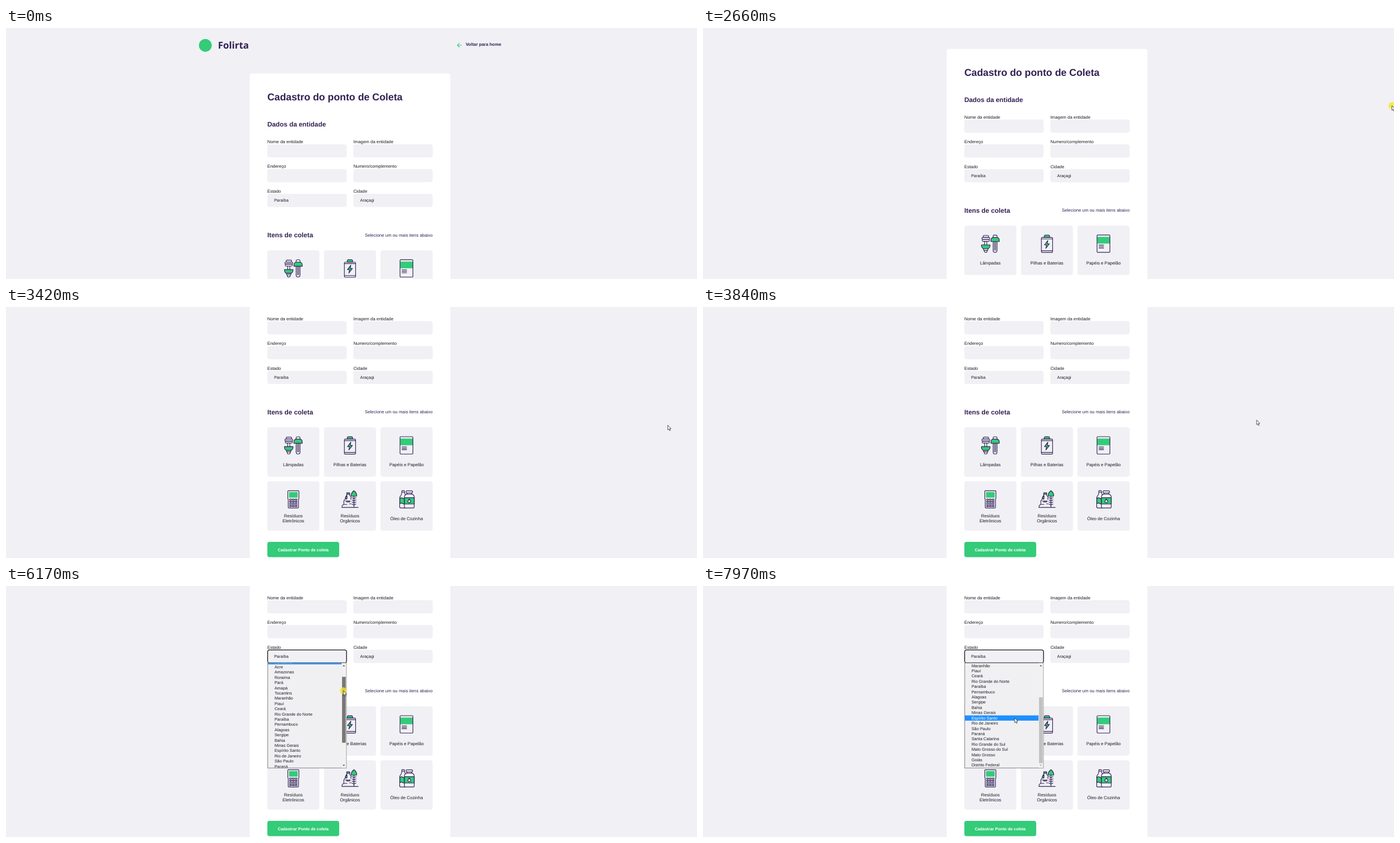
These frames come from a looping animation (1242x451 px, 8000 ms). An HTML page:

```html
<!DOCTYPE html>
<html lang="pt-BR">
<head>
<meta charset="utf-8">
<title>Cadastro do ponto de coleta</title>
<style>
  html, body { margin: 0; width: 100%; height: 100%; overflow: hidden; background: #f0f0f5; }
  svg { display: block; width: 1242px; height: 451px; }
  text { font: 7.9px "Liberation Sans", Arial, sans-serif; fill: #1c1a22; text-rendering: geometricPrecision; }
  .purple { fill: #322153; }
  .h1 { font-size: 17.8px; font-weight: 700; }
  .h2 { font-size: 11.85px; font-weight: 700; }
  .bold { font-weight: 700; }
  .small { font-size: 7.4px; }
  .brand { font: 700 17px "Noto Sans", "Open Sans", sans-serif; }
  .mid { text-anchor: middle; }
  .end { text-anchor: end; }
  .white { fill: #fff; }
  .box { fill: #f0f0f5; }
  .icon { fill: none; stroke: #322153; stroke-width: 1.15; stroke-linejoin: round; stroke-linecap: round; }
  .icon .g { fill: #34cb79; }
  .icon .flat { fill: #34cb79; stroke: none; }
  .icon .bg { fill: #f0f0f5; }
</style>
</head>
<body>
<svg viewBox="0 0 1242 451">
  <defs><clipPath id="listClip"><rect x="470" y="138.4" width="142" height="188.2"/></clipPath></defs>
  <g id="page">
    <circle cx="358.3" cy="31.2" r="11.5" fill="#34cb79"/>
    <text class="brand purple" x="381" y="37.4">Folirta</text>
    <path d="M819 31h-7.6m3.7-3.8l-3.8 3.8l3.8 3.8" fill="none" stroke="#34cb79" stroke-width="1.2"/>
    <text class="bold purple" x="826.2" y="32.1">Voltar para home</text>
    <rect x="437.9" y="81.8" width="360.8" height="640" rx="4" fill="#fff"/>
    <text class="h1 purple" x="469.7" y="130.3">Cadastro do ponto de Coleta</text>
    <text class="h2 purple" x="469.7" y="177.3">Dados da entidade</text>
    <g id="fields"></g>
    <text class="h2 purple" x="469.7" y="376.3">Itens de coleta</text>
    <text class="purple end" x="766.9" y="374.7">Selecione um ou mais itens abaixo</text>
    <g id="items"></g>
    <rect x="469.7" y="605.2" width="129.2" height="27.6" rx="4" fill="#34cb79"/>
    <text class="small bold white mid" x="534.2" y="622">Cadastrar Ponto de coleta</text>
  </g>
  <g id="menu">
    <rect x="470.3" y="114.8" width="141.8" height="23.4" rx="3.5" fill="none" stroke="#101010" stroke-width="1.3"/>
    <rect x="470.4" y="138.2" width="141.4" height="188.8" fill="#f0f0f3" stroke="#767676" stroke-width=".9"/>
    <g clip-path="url(#listClip)"><g id="list"><rect id="mark" x="470.8" width="132.4" height="9.41" fill="#1e90ff"/></g></g>
    <rect x="603.4" y="138.6" width="8" height="188" fill="#f1f1f1"/>
    <path id="up" d="M605.2 144.2l2-2.2l2 2.2z"/>
    <path id="down" d="M605.2 321.2l2 2.2l2-2.2z"/>
    <rect id="thumb" x="604" width="6.6" height="118.4"/>
  </g>
  <g id="pointer">
    <circle id="press" r="6.2" fill="#f6e62c" opacity=".78"/>
    <path d="M0 0V8.4L1.9 6.7L3.2 9.8L4.6 9.2L3.3 6.2H5.9Z" fill="#fff" stroke="#222" stroke-width=".75"/>
  </g>
</svg>
<script>
const $ = id => document.getElementById(id);
const LOOP = 8000, ROW = 9.41, LIST_TOP = 138.4, MAX_SCROLL = 9 * ROW;
const THUMB_TOP = 147, THUMB_RANGE = 53, GRAB_Y = 172;

const add = (parent, html) => parent.insertAdjacentHTML("beforeend", html);
const text = (x, y, str, cls = "") => `<text x="${x}" y="${y}" class="${cls}">${str}</text>`;
const rect = (x, y, w, h, r = 0, cls = "") =>
  `<rect x="${x}" y="${y}" width="${w}" height="${h}" rx="${r}" class="${cls}"/>`;
const path = (d, cls = "") => `<path d="${d}" class="${cls}"/>`;

// Form fields, two per row
[["Nome da entidade"], ["Imagem da entidade"], ["Endereço"], ["Numero/complemento"],
 ["Estado", "Paraíba"], ["Cidade", "Araçagi"]].forEach(([label, value = ""], i) => {
  const x = i % 2 ? 624.4 : 469.7, y = 208.9 + 44.55 * (i >> 1);
  add($("fields"), text(x, y - 2, label) + rect(x, y, 142.5, 23.6, 4, "box") +
    text(x + 12.2, y + 14.2, value, "small"));
});

// Icons are drawn around their own centre
const lamps =
  rect(-12.8, -15, 9.6, 3.6, 1.2) + rect(-15.3, -11.4, 14.2, 3.4, 1.5) + rect(-14.6, -8, 12.8, 3.6, 1.5) +
  path("M-10.3 -4.4V2M-6.4 -4.4V2") +
  path("M-16 2h15.4v2q0 2.2-3 4.8h-9.4q-3-2.6-3-4.8z", "g") +
  path("M-12 8.8h7.4v2.8h-7.4zM-10.8 11.6v2q0 1.6 1.6 1.6h1.8q1.6 0 1.6-1.6v-2") +
  path("M5 -11.4v-2.4q0-1.8 1.8-1.8h3.4q1.8 0 1.8 1.8v2.4") +
  path("M1 -4v-2.4q0-5 5-5h5q5 0 5 5v2.4z", "g") +
  path("M5 -4v16q0 3.4 3.5 3.4t3.5-3.4v-16M7.4 -4v15.6M9.6 -4v15.6");

const battery =
  path("M-4.8 -11.5v-2.2q0-2 2-2h5.6q2 0 2 2v2.2z", "g") +
  rect(-10, -11.4, 20.2, 27, 1.6) + path("M-10 -8.7h20.2M-10 12.6h20.2") +
  path("M1.6 -6L-4.4 2h3.8l-1.4 6.2l6.4-8.2h-3.8z", "g");

const paper =
  rect(-11.5, -12.4, 22.8, 12, 0, "flat") + rect(-11.7, -15.8, 23.2, 31.2, 1.6) +
  path("M-8.2 2.4h8.4M-8.2 5h8.4M-8.2 7.6h8.4");

let phone = path("M-8 15.4q-1.2 0-1.2-1.2v-14l-.8-2v-12.6q0-1.2 1.2-1.2h17.6q1.2 0 1.2 1.2v12.6l-.8 2v14q0 1.2-1.2 1.2z") +
  rect(-7.8, -13.4, 15.6, 10, .6, "flat");
for (let i = 0; i < 12; i++)
  phone += rect(-6.8 + 5 * (i % 3), -.8 + 3.9 * Math.floor(i / 3), 3.4, 2, .6);

let organic =
  path("M-14.2 14.2q-.6-4.4 3.2-5v-5.6q.2-2.6 3-4.4v-1.8q0-3 2.4-5v-2h5v2q2.6 2 2.6 5l-1 2.2") +
  path("M-5.8 -12h5.4v2.6h-5.4z", "g") + path("M-8.6 -2.4l3-5q1 3 0 7z", "g") +
  path("M-8.2 2.8h9M-10.6 9h5.4M-6 4.6h5.8M-1 8h3.2M-14.2 14.4H14.8") +
  path("M7.2 -15.8q5 4 5 8.4q0 1.6-1.4 1.6h-7.2q-1.4 0-1.4-1.6q0-4.4 5-8.4z", "g") +
  path("M7.2 -5.6V14");
for (let y = -1.6; y < 12; y += 3.8) organic += path(`M3.6 ${y - 1.6}l3.6 2l3.6-2`);

const oil =
  path("M-8.8 -12.8h5.4M-8.4 -15.6h4.6v2.8h-4.6zM-8.4 -12.8q0 4-3 7.4q-1.4 2-.6 5.2l-.4 13q0 2.6 2.4 2.6h7.6") +
  path("M-12 -1.8q3-2.4 6 0t4-.4v9q-3 2.2-5 .6t-5 0z", "g") + path("M-3.8 -12.8l2 5.6") +
  path("M-2.4 15.4q-1.4 0-1.4-1.6v-18.6q0-3 4-4.8h9.6q4 1.8 4 4.8v18.6q0 1.6-1.4 1.6z", "bg") +
  rect(-3.8, -3.2, 17.6, 11.4, 0, "g") + rect(-.8, -15.4, 11.6, 3.6, 1) +
  path("M.8 -11.8v2.2M9.2 -11.8v2.2") +
  path("M5 -.8q2.6 3 2.6 4.4q0 2.2-2.6 2.2t-2.6-2.2q0-1.4 2.6-4.4z", "bg");

[[lamps, "Lâmpadas"], [battery, "Pilhas e Baterias"], [paper, "Papéis e Papelão"],
 [phone, "Resíduos", "Eletrônicos"], [organic, "Resíduos", "Orgânicos"], [oil, "Óleo de Cozinha"]
].forEach(([icon, ...lines], i) => {
  const x = 469.7 + 101.7 * (i % 3), y = 399.5 + 97 * Math.floor(i / 3), cx = x + 46.8;
  const base = y + (lines.length > 1 ? 65.3 : 69.5);
  add($("items"), rect(x, y, 93.6, 88.6, 4, "box") +
    `<g class="icon" transform="translate(${cx} ${y + 32.6})">${icon}</g>` +
    lines.map((s, k) => text(cx, base + 8.7 * k, s, "mid")).join(""));
});

const states = ("Selecione o Estado,Opção de Estado,Rondônia,Acre,Amazonas,Roraima,Pará,Amapá,Tocantins," +
  "Maranhão,Piauí,Ceará,Rio Grande do Norte,Paraíba,Pernambuco,Alagoas,Sergipe,Bahia,Minas Gerais," +
  "Espírito Santo,Rio de Janeiro,São Paulo,Paraná,Santa Catarina,Rio Grande do Sul,Mato Grosso do Sul," +
  "Mato Grosso,Goiás,Distrito Federal").split(",");
states.forEach((s, i) => add($("list"), text(482.7, 145.6 + ROW * i, s, "small")));
const rows = $("list").querySelectorAll("text");

// Bursts of motion: start, end, number of steps
const bursts = [[0, 0, 1], [170, 370, 4], [570, 850, 5], [1310, 1790, 6], [1990, 1990, 1], [2520, 3280, 12],
  [3350, 4120, 12], [4190, 4520, 5], [4720, 4920, 4], [5120, 5890, 12], [5960, 6730, 12],
  [6800, 7350, 9], [7550, 7970, 7]];
const scrollKeys = [[1230, 0], [1790, 6.5], [1990, 7.4], [2450, 7.4], [3073, 118], [3280, 172], [3350, 183.3]];
const pointerKeys = [[170, 1228, 442], [370, 1163, 306], [500, 1163, 306], [780, 1104, 165], [850, 1104, 165],
  [2520, 1239, 126], [3073, 1236, 180], [3280, 1231, 211], [3350, 1222, 214], [3840, 995, 203],
  [4120, 620, 124], [4350, 597, 128], [4520, 594, 128], [4650, 594, 128], [4920, 590, 143],
  [5050, 590, 143], [5260, 586, 153], [5500, 601, 163], [5640, 606, 170], [5890, 606, 172],
  [6170, 606.4, 188.2], [6500, 607, 212], [6730, 607, 226], [6800, 606, 227], [6940, 598, 236],
  [7350, 566, 278], [7480, 566, 278], [7850, 560, 239], [7970, 560, 237]];

function snap(t) {
  const [a, b, n] = bursts.findLast(r => r[0] <= t);
  if (n === 1) return a;
  const step = (b - a) / (n - 1);
  return a + step * Math.min(n - 1, Math.floor((t - a) / step + 0.01));
}

function at(keys, t) {
  const i = keys.findIndex(k => k[0] > t);
  if (i < 0) return keys.at(-1).slice(1);
  if (i === 0) return keys[0].slice(1);
  const a = keys[i - 1], b = keys[i], p = (t - a[0]) / (b[0] - a[0]);
  return a.slice(1).map((v, k) => v + (b[k + 1] - v) * p);
}

const within = (t, a, b) => t >= a && t < b;
const show = (el, on) => el.setAttribute("visibility", on ? "visible" : "hidden");

function draw(time) {
  const t = snap(time);
  const [scroll] = at(scrollKeys, t), [x, y] = at(pointerKeys, t);
  $("page").setAttribute("transform", `translate(0 ${-scroll})`);

  show($("pointer"), within(t, 170, 849) || t >= 2520);
  $("pointer").setAttribute("transform", `translate(${x} ${y})`);
  const dragging = within(t, 5850, 6790);
  $("press").setAttribute("opacity", within(t, 2520, 3340) || within(t, 4260, 4400) || dragging ? .78 : 0);

  show($("menu"), t >= 4340);
  const moved = t < 5850 ? 0 : t >= 6730 ? THUMB_RANGE : Math.max(0, Math.min(THUMB_RANGE, y - GRAB_Y));
  const offset = moved / THUMB_RANGE * MAX_SCROLL;
  const onBar = x > 603;
  const active = onBar ? 2 : y < LIST_TOP ? 13 : Math.floor((y - LIST_TOP + offset) / ROW);
  $("list").setAttribute("transform", `translate(0 ${-offset})`);
  $("mark").setAttribute("y", LIST_TOP + ROW * active);
  rows.forEach((row, i) => row.classList.toggle("white", i === active));
  $("thumb").setAttribute("y", THUMB_TOP + moved);
  $("thumb").setAttribute("fill", dragging ? "#787878" : onBar ? "#a8a8a8" : "#c1c1c1");
  $("up").setAttribute("fill", moved > 0 ? "#404040" : "#a3a3a3");
  $("down").setAttribute("fill", moved < THUMB_RANGE ? "#404040" : "#a3a3a3");
}

const start = performance.now();
function tick() {
  draw((performance.now() - start) % LOOP);
  requestAnimationFrame(tick);
}
tick();
</script>
</body>
</html>
```
